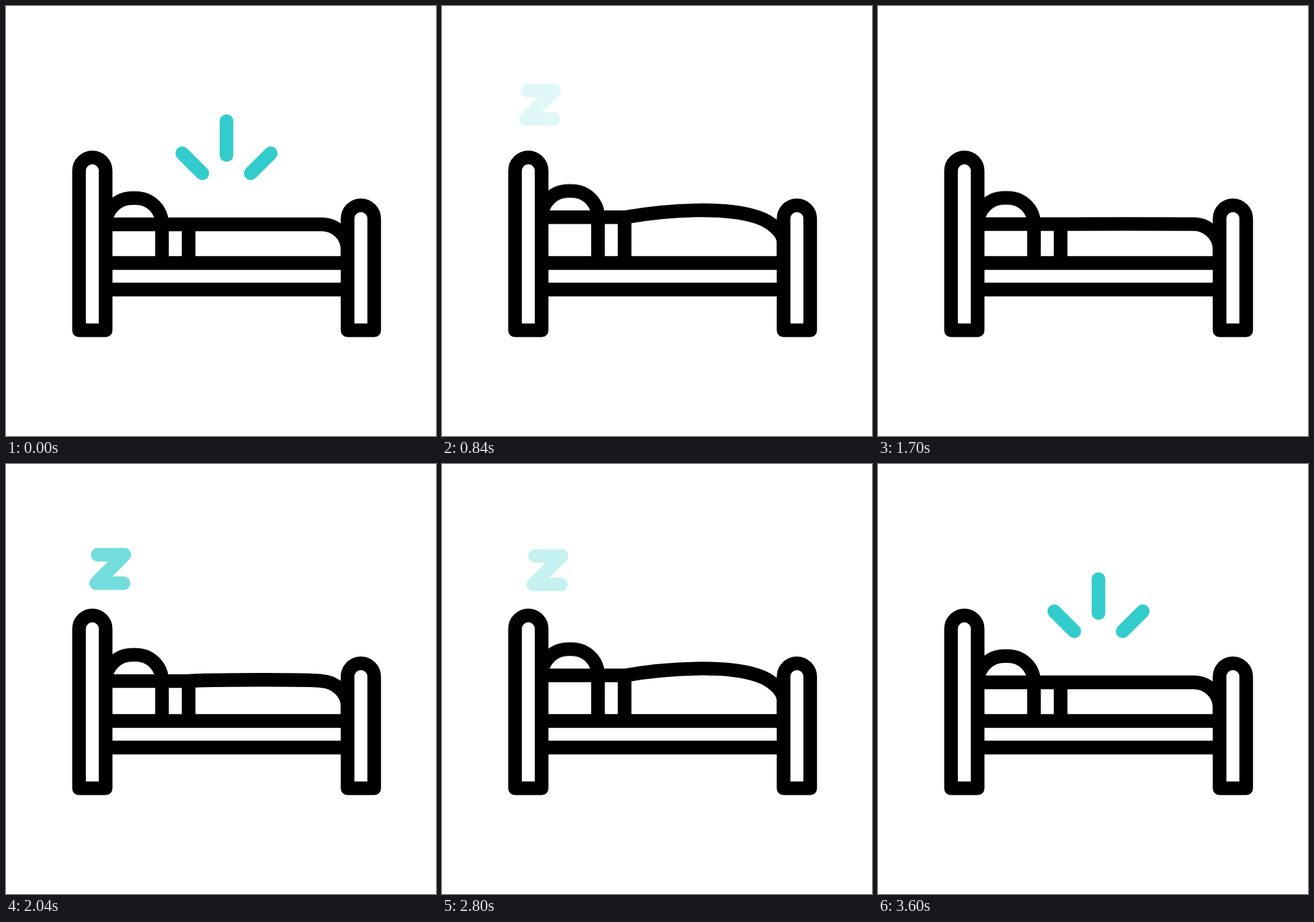
Write an HTML page that moves like this. It is 640 px wide and 640 px high and loops after 3620 ms.

```html
<!DOCTYPE html>
<html lang="en">
<head>
<meta charset="utf-8">
<title>Sleeping bed</title>
<style>
  html, body { margin: 0; width: 100%; height: 100%; overflow: hidden; background: #fff; }
  svg { display: block; width: 100vw; height: 100vh; }
  path {
    fill: none; stroke: #000; stroke-width: 20.3;
    stroke-linecap: round; stroke-linejoin: round;
    animation: 3620ms linear infinite backwards;
  }
  .frame, .pillow, .sheet { stroke-linecap: butt; }
  .post { fill: #fff; }
  .z, .rays { stroke: #3cc; }

  .pillow { animation-name: lift; }
  .sheet { animation-name: swell; }
  .pillow, .sheet { animation-timing-function: cubic-bezier(.333, 0, .667, 1); }
  .rays { animation-name: flash; }
  .z { opacity: 0; animation-name: drift, fade; animation-delay: var(--at); }

  /* two breaths of 1800 ms, then a short rest */
  @keyframes lift {
    0%, 49.724%, 99.448%, 100% { transform: translateY(0); }
    24.862%, 74.586% { transform: translateY(-10.7px); }
  }
  @keyframes swell {
    0%, 49.724%, 99.448%, 100% {
      d: path("M148 325 L272 325 C272 325 470 325 470 325 C491 325 508.4 342 508.4 363 L508.4 382 M232.2 325 L232.2 382 M271.8 325 L271.8 382");
    }
    24.862%, 74.586% {
      d: path("M148 314.3 L272 314.3 C338 302.8 422 297.8 470 314.3 C486 319.8 508.4 334.3 508.4 352.3 L508.4 382 M232.2 314.3 L232.2 382 M271.8 314.3 L271.8 382");
    }
  }
  @keyframes drift {
    0% { transform: translate(12.4px, 12.4px); }
    15.055%, 100% { transform: translate(-.7px, -.7px); }
  }
  @keyframes fade {
    0%, 15.055%, 100% { opacity: 0; }
    5.42%, 9.64% { opacity: 1; }
  }
  @keyframes flash {
    0%, .55%, 99.448%, 100% { opacity: 1; }
    2.76%, 97% { opacity: 0; }
  }
</style>
</head>
<body>
<svg viewBox="0 0 640 640">
  <path class="rays" d="M328.2 171.3V221.8M262.3 219.2L292.2 249M394.1 219.2L364.2 249"/>

  <path class="z" style="--at:327ms" d="M127.2 125.9H167L124.8 168.2H165.8"/>
  <path class="z" style="--at:1155ms" d="M127.2 125.9H167L124.8 168.2H165.8"/>
  <path class="z" style="--at:1907ms" d="M127.2 125.9H167L124.8 168.2H165.8"/>
  <path class="z" style="--at:2746ms" d="M127.2 125.9H167L124.8 168.2H165.8"/>

  <path class="pillow" d="M148.3 325C148.3 303 166 285.8 188 285.8H193C215 285.8 232.2 303 232.2 325"/>
  <path class="sheet" d="M148 325 L272 325 C272 325 470 325 470 325 C491 325 508.4 342 508.4 363 L508.4 382 M232.2 325 L232.2 382 M271.8 325 L271.8 382"/>
  <path class="frame" d="M148 382.5H508M148 422H508"/>
  <path class="post" d="M108.7 482.7V245.2A19.8 19.8 0 0 1 148.3 245.2V482.7Z"/>
  <path class="post" d="M508.4 482.7V316.4A19.8 19.8 0 0 1 548 316.4V482.7Z"/>
</svg>
</body>
</html>
```
